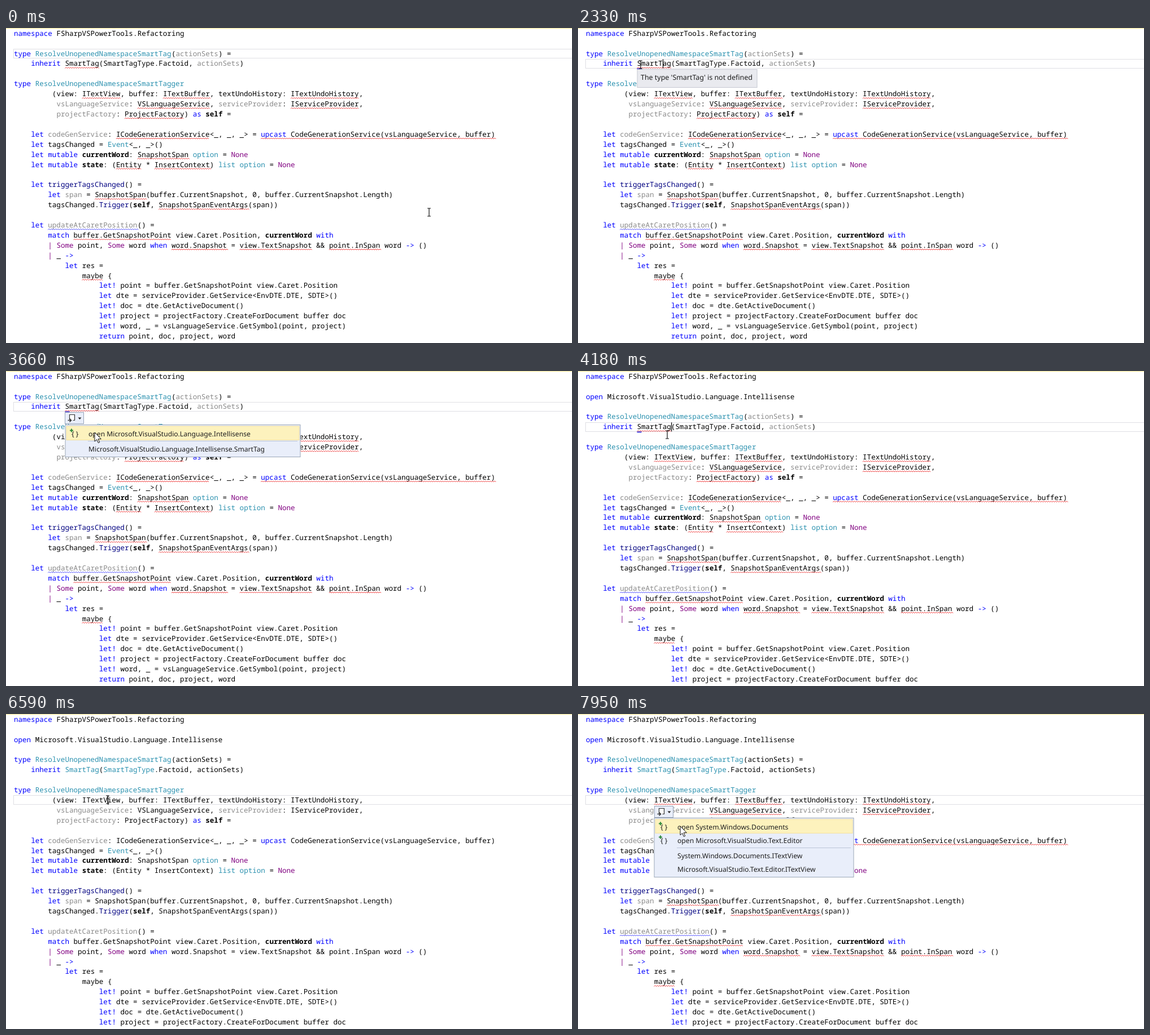
Write an HTML page that moves like this. It is 1002 by 559 pixels and loops after 8000 ms.

```html
<!DOCTYPE html>
<html lang="en">
<head>
<meta charset="utf-8">
<title>Resolve unopened namespace</title>
<style>
  html, body { margin: 0; width: 100%; height: 100%; overflow: hidden; background: #fff; }
  svg { display: block; width: 1002px; height: 559px; }
  text { white-space: pre; text-rendering: geometricPrecision; }
  .mono { font: 12.567px "Noto Sans Mono", "DejaVu Sans Mono", monospace; fill: #000; }
  .ui { font: 12.13px "Noto Sans", "Open Sans", sans-serif; fill: #1e1e1e; }
  .tip { font-size: 12.45px; }
  .keyword { fill: #0000ff; }
  .union { fill: #800080; }
  .type { fill: #2b91af; }
  .func { fill: #000080; }
  .unused { fill: #8a8a8a; }
  .bold { font-weight: 700; }
  .typed .lateType { fill: #2b91af; }
  .typed .lateUsed { fill: #000; }
  .lateUsed { fill: #8a8a8a; }
</style>
</head>
<body>
<svg id="stage" viewBox="0 0 1002 559"></svg>
<script>
const LOOP = 8000, LEFT = 14, CHAR = 7.54, ROW = 17.91, BASE = 13.7;
const colX = col => LEFT + col * CHAR;
const rowY = row => BASE + row * ROW;

const source = `namespace FSharpVSPowerTools.Refactoring

type ResolveUnopenedNamespaceSmartTag(actionSets) =
    inherit SmartTag(SmartTagType.Factoid, actionSets)

type ResolveUnopenedNamespaceSmartTagger
         (view: ITextView, buffer: ITextBuffer, textUndoHistory: ITextUndoHistory,
          vsLanguageService: VSLanguageService, serviceProvider: IServiceProvider,
          projectFactory: ProjectFactory) as self =

    let codeGenService: ICodeGenerationService<_, _, _> = upcast CodeGenerationService(vsLanguageService, buffer)
    let tagsChanged = Event<_, _>()
    let mutable currentWord: SnapshotSpan option = None
    let mutable state: (Entity * InsertContext) list option = None

    let triggerTagsChanged() =
        let span = SnapshotSpan(buffer.CurrentSnapshot, 0, buffer.CurrentSnapshot.Length)
        tagsChanged.Trigger(self, SnapshotSpanEventArgs(span))

    let updateAtCaretPosition() =
        match buffer.GetSnapshotPoint view.Caret.Position, currentWord with
        | Some point, Some word when word.Snapshot = view.TextSnapshot && point.InSpan word -> ()
        | _ ->
            let res =
                maybe {
                    let! point = buffer.GetSnapshotPoint view.Caret.Position
                    let dte = serviceProvider.GetService<EnvDTE.DTE, SDTE>()
                    let! doc = dte.GetActiveDocument()
                    let! project = projectFactory.CreateForDocument buffer doc
                    let! word, _ = vsLanguageService.GetSymbol(point, project)
                    return point, doc, project, word`.split('\n');

const wordClass = {};
for (const [name, words] of Object.entries({
  keyword: 'namespace open type inherit as upcast let let! mutable match with when return ->',
  union: 'Some None |',
  bold: 'self currentWord state',
  type: 'ResolveUnopenedNamespaceSmartTag ResolveUnopenedNamespaceSmartTagger Event option list',
  func: 'triggerTagsChanged Trigger',
  unused: 'updateAtCaretPosition codeGenService',
  lateType: 'SmartTag SmartTagType',
  lateUsed: 'actionSets'
})) words.split(' ').forEach(w => wordClass[w] = name);
const unusedWhenDeclared = /^(vsLanguageService|serviceProvider|projectFactory|span)(:| =)/;

const errors = {
  6: ['ITextView', 'ITextBuffer', 'ITextUndoHistory'],
  7: ['VSLanguageService', 'IServiceProvider'],
  8: ['ProjectFactory'],
  10: ['ICodeGenerationService', 'upcast CodeGenerationService(vsLanguageService, buffer)'],
  12: ['SnapshotSpan'],
  13: ['Entity', 'InsertContext'],
  16: ['SnapshotSpan'],
  17: ['SnapshotSpanEventArgs'],
  19: ['updateAtCaretPosition'],
  20: ['buffer.GetSnapshotPoint'],
  21: ['word.Snapshot', 'view.TextSnapshot', 'point.InSpan'],
  24: ['maybe']
};

function add(parent, tag, attrs = {}, content = '') {
  const node = document.createElementNS('http://www.w3.org/2000/svg', tag);
  for (const key in attrs) node.setAttribute(key, attrs[key]);
  node.textContent = content;
  parent.append(node);
  return node;
}
const box = (parent, x, y, width, height, fill, stroke = 'none') =>
  add(parent, 'rect', { x, y, width, height, fill, stroke });
const path = (parent, d, stroke, fill = 'none', width = 1) =>
  add(parent, 'path', { d, stroke, fill, 'stroke-width': width });
const label = (parent, x, y, text, cls = 'ui') => add(parent, 'text', { x, y, class: cls }, text);

function codeLine(parent, line, row) {
  for (const { 0: word, index } of line.matchAll(/->|[A-Za-z]+!?|[^\sA-Za-z]+/g)) {
    const cls = unusedWhenDeclared.test(line.slice(index)) ? 'unused' : wordClass[word] || '';
    label(parent, colX(index), rowY(row), word, 'mono ' + cls);
  }
}

function squiggle(parent, row, text) {
  const x = colX(source[row].indexOf(text)), waves = Math.round(text.length * CHAR / 4);
  path(parent, `M${x} ${rowY(row) + 4.2}` + 'l2 -2l2 2'.repeat(waves),
    row === 19 ? '#4646ff' : '#f03a3a');
}

function smartTag(col, row) {
  const group = add(stage, 'g'), x = Math.round(colX(col)) + .5, y = Math.round(rowY(row) + 6) + .5;
  box(group, x, y, 33, 20, '#e9eefa', '#97a3b8');
  path(group, `M${x + 8} ${y + 13}v-9h9v10h-3`, '#333', '#fff', 1.2);
  path(group, `M${x + 5} ${y + 14}h6m-3 -3l3 3l-3 3`, '#333', 'none', 1.5);
  path(group, `M${x + 23} ${y + 9}h6l-3 3.5z`, 'none', '#222');
  return group;
}

function menu(x, y, width, opens, names) {
  const group = add(stage, 'g');
  const split = y + 16.5 + 24 * (opens.length - 1) + 12.5;
  box(group, x, y, width, split + 28 - y + 24 * (names.length - 1), '#e9eefa', '#9ba7b7');
  box(group, x + 2, y + 2.5, width - 4, 24.5, '#fdf2bd', '#f3e1a0');
  path(group, `M${x + 40} ${Math.round(split) - .5}H${x + width - 5}`, '#bcc5d8');
  opens.forEach((text, i) => {
    const mid = y + 16 + 24 * i;
    label(group, x + 41, mid + 4.3, 'open ' + text);
    label(group, x + 11, mid + 4.3, '{ }').setAttribute('font-weight', 700);
    path(group, `M${x + 8} ${mid - 6}h6m-3 -3v6`, '#2f8a3c', 'none', 2);
  });
  names.forEach((text, i) => label(group, x + 41, split + 18 + 24 * i, text));
  return group;
}

const stage = document.getElementById('stage');
box(stage, 0, 0, 1002, 559, '#fff');
box(stage, 0, 0, 1002, 1.3, '#fbefa6');
const currentLine = box(stage, 13.5, 0, 1000, 16, 'none', '#dfdfe4');
const highlight = box(stage, colX(12), rowY(5) - 12, 8 * CHAR, 16, '#dde1cf');

codeLine(stage, source[0], 0);
const openLine = add(stage, 'g');
codeLine(openLine, 'open Microsoft.VisualStudio.Language.Intellisense', 2);
const body = add(stage, 'g');
source.forEach((line, row) => row > 1 && codeLine(body, line, row));
const errorMarks = add(body, 'g');
for (const row in errors) errors[row].forEach(text => squiggle(errorMarks, +row, text));
const tagError = add(body, 'g');
squiggle(tagError, 3, 'SmartTag');
const tagMark = box(body, colX(12), rowY(3) + 4, 8, 2.2, '#4a4ae0');
const caret = box(stage, 0, 0, 1.2, 16, '#000');

const tooltip = add(stage, 'g');
box(tooltip, 105, 73.5, 212, 32, '#e9eaef', '#c6c8d2');
label(tooltip, 111, 91.5, "The type 'SmartTag' is not defined", 'ui tip');

const firstTag = smartTag(12, 3), secondTag = smartTag(16, 8);
const firstMenu = menu(105, 95.5, 416, ['Microsoft.VisualStudio.Language.Intellisense'],
  ['Microsoft.VisualStudio.Language.Intellisense.SmartTag']);
const secondMenu = menu(135, 184.5, 353, ['System.Windows.Documents', 'Microsoft.VisualStudio.Text.Editor'],
  ['System.Windows.Documents.ITextView', 'Microsoft.VisualStudio.Text.Editor.ITextView']);

const beam = add(stage, 'g');
path(beam, 'M-3 -7h2.5l.5 .5l.5 -.5h2.5M0 -6.5v13M-3 7h2.5l.5 -.5l.5 .5h2.5', '#111', 'none', 1.2);
const arrow = add(stage, 'g');
path(arrow, 'M0 0v16l3.7 -3.5l2.6 6l2.4 -1l-2.6 -5.8h5.2z', '#111', '#fff');

// start, end, steps, x, y
const moves = [
  [280, 1090, 7, 145, 65],
  [1790, 2304, 5, 111, 65],
  [2840, 2840, 1, 112, 77],
  [3120, 3660, 5, 157, 109],
  [4060, 4060, 1, 158, 112.5],
  [4490, 5420, 8, 169, 138],
  [5540, 5673, 2, 171, 146],
  [5806, 6339, 5, 182, 151],
  [6590, 7290, 6, 150, 161],
  [7430, 7430, 1, 158, 172],
  [7680, 7950, 3, 181, 199]
];
// from, to, column, row
const carets = [
  [1390, 1790, 18, 3], [2304, 2840, 18, 3],
  [4060, 4623, 20, 5], [5154, 5806, 20, 5],
  [6470, 7010, 22, 8]
];

const ease = f => f * f * (3 - 2 * f);
function pointer(t) {
  let x = 749, y = 327;
  for (const [start, end, steps, toX, toY] of moves) {
    if (t < start) break;
    const step = end > start ? Math.floor((t - start) / (end - start) * (steps - 1) + 1e-6) + 1 : steps;
    const f = ease(Math.min(1, step / steps));
    x += (toX - x) * f;
    y += (toY - y) * f;
  }
  return [x, y];
}

const show = (node, on) => node.setAttribute('visibility', on ? 'visible' : 'hidden');

function draw(t) {
  const during = (from, to = LOOP) => t >= from && t < to;
  const row = t < 1390 ? 2 : t < 4060 ? 3 : t < 6470 ? 5 : 8;
  currentLine.setAttribute('y', Math.round(rowY(row) - 12.5) + .5);
  body.setAttribute('transform', `translate(0 ${during(4060) ? 2 * ROW : 0})`);
  stage.classList.toggle('typed', during(5021));
  show(openLine, during(4060));
  show(highlight, during(5287, 6470));
  show(errorMarks, !during(5540, 7150));
  show(tagError, during(0, 5540));
  show(tagMark, during(1390, 5021));
  show(tooltip, during(1390, 2690));
  show(firstTag, during(2690, 4060));
  show(firstMenu, during(3120, 4060));
  show(secondTag, during(7430));
  show(secondMenu, during(7680));

  const blink = carets.find(([from, to]) => during(from, to));
  show(caret, blink);
  if (blink) {
    caret.setAttribute('x', colX(blink[2]) + .2);
    caret.setAttribute('y', rowY(blink[3]) - 12);
  }

  const overPopup = during(2840, 4060) || during(7430);
  const place = `translate(${pointer(t).map(Math.round).join(' ')})`;
  show(beam, !overPopup);
  show(arrow, overPopup);
  beam.setAttribute('transform', place);
  arrow.setAttribute('transform', place);
}

const begin = performance.now();
function tick() {
  draw((performance.now() - begin) % LOOP);
  requestAnimationFrame(tick);
}
draw(0);
requestAnimationFrame(tick);
</script>
</body>
</html>
```
